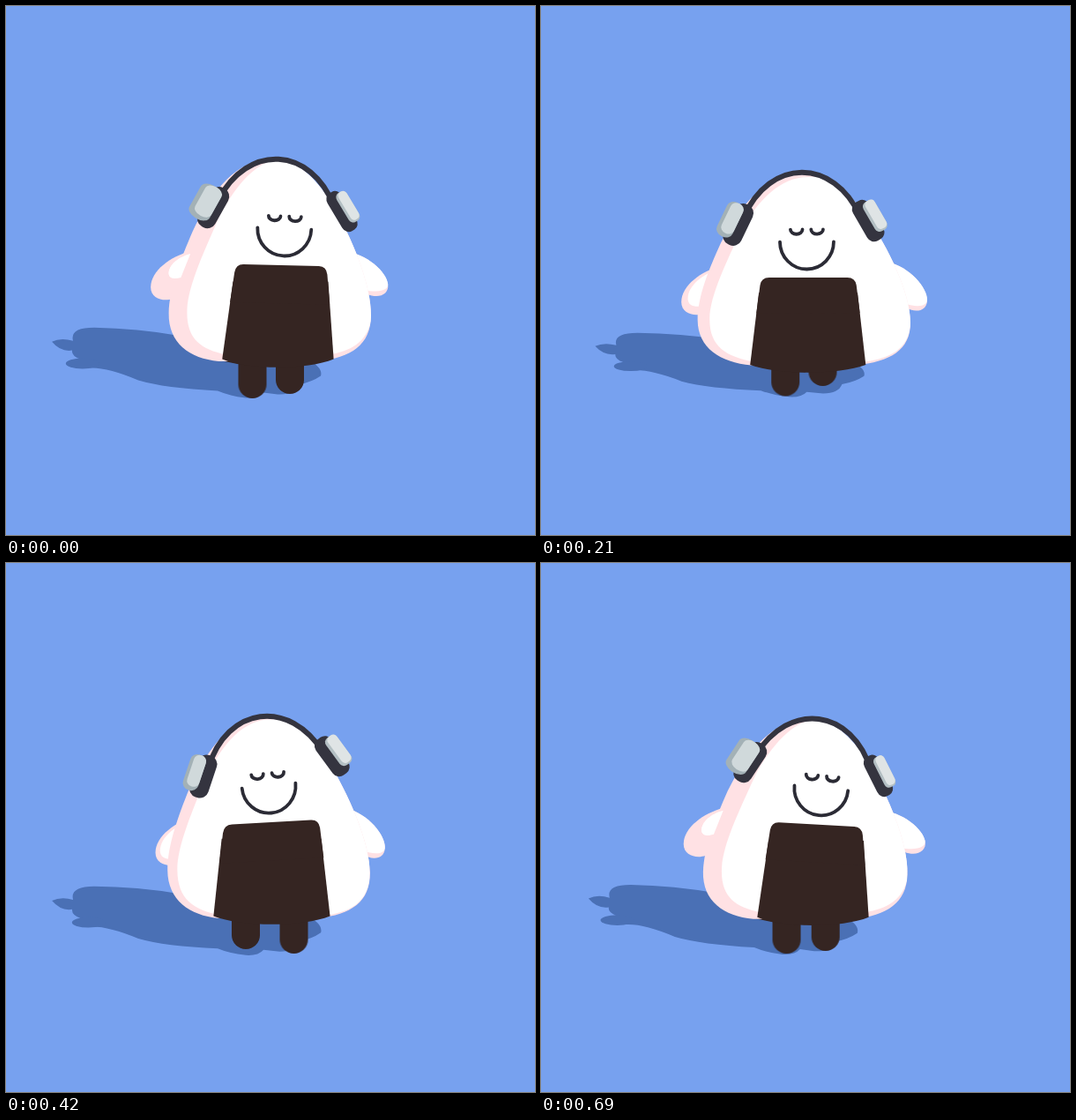
An HTML page without scripts for the animation above (720 ms loop, 600 by 600 pixels).

```html
<!DOCTYPE html>
<html lang="en">
<head>
<meta charset="utf-8">
<title>Dancing rice ball</title>
<style>
  /* bob: -1 stretched, 1 squashed. lean: -1 left, 1 right. yaw: 0 front, 1 turned. */
  @property --bob { syntax: "<number>"; inherits: true; initial-value: 0; }
  @property --lean { syntax: "<number>"; inherits: true; initial-value: 0; }
  @property --yaw { syntax: "<number>"; inherits: true; initial-value: 0; }

  @keyframes bob { from { --bob: -1; } to { --bob: 1; } }
  @keyframes lean { from { --lean: -1; } to { --lean: 1; } }
  @keyframes yaw { from { --yaw: 0; } to { --yaw: 1; } }

  html, body { margin: 0; width: 100%; height: 100%; overflow: hidden; background: #77a1ef; }

  svg {
    --sine: cubic-bezier(.364, 0, .636, 1);
    --tilt: calc(8 * var(--lean) + 2 * var(--bob) - 1);
    display: block;
    width: 100%;
    height: 100%;
    animation:
      bob 180ms var(--sine) -330ms infinite alternate,
      lean 180ms var(--sine) -230ms infinite alternate,
      yaw 360ms var(--sine) -380ms infinite alternate;
  }

  .pink { fill: #ffe1e4; }
  .white { fill: #fff; }
  .nori { fill: #352522; }
  .dark { fill: #34343f; }

  .shadow {
    fill: #4a70b5;
    transform:
      translate(calc(334.4px + 5px * var(--bob)), calc(376.5px + 2px * var(--bob)))
      skewY(calc(.5deg * (var(--lean) - .6)))
      scale(1, calc(.96 - .04 * var(--bob)))
      translate(-330px, -375px);
  }
  .shadow-hand { transform: translate(calc(-7px * (var(--lean) - .6)), 0); }

  .body {
    transform:
      translate(298px, calc(402.5px + 2.5px * var(--bob)))
      skewX(calc(-1.5deg * var(--lean)))
      scale(calc(1 + .027 * var(--bob)), calc(1 - .031 * var(--bob)))
      translate(-298px, -402.5px);
  }
  .front {
    transform:
      translate(416px, calc(402px - 4.5px * var(--yaw)))
      skewX(calc(-1.7deg * var(--yaw)))
      scale(calc(1 - .044 * var(--yaw)), 1)
      translate(-416px, -402px);
  }

  .underside { transform: translate(0, calc(3.5px * var(--bob))); }
  .wrap {
    transform:
      translate(calc(300.5px + 8px * var(--yaw)), calc(403.5px + 3.5px * var(--bob)))
      skewX(calc(-1.1deg * var(--lean) - 1.3deg * var(--yaw)))
      scale(calc(1 - .05 * var(--yaw)), calc(1 - .039 * var(--bob)));
  }
  .wrap-top { transform: translate(0, -103px) skewY(calc(.55deg * var(--tilt))); }

  .arm-left {
    --turn: min(1, var(--yaw) * (1.6 + var(--lean)) / 2);
    transform: translate(
      calc(180px - 5px * var(--bob) - 4px * var(--yaw) - 2px * var(--lean)),
      calc(330px + 5px * var(--bob) - 6px * var(--lean) - 4px * var(--yaw)));
  }
  .patch { transform: translate(30px, -37px) scale(calc(1 - .4 * var(--turn))) translate(-30px, 37px); }
  .near { opacity: clamp(0, 20 * (var(--yaw) - .5), 1); }
  .arm-right {
    transform:
      translate(
        calc(421.5px + 4px * var(--bob) + 3.5px * var(--lean)),
        calc(325.5px + 6.5px * var(--bob) - 5.5px * var(--lean)))
      rotate(calc(-9deg * var(--lean)));
  }

  .face {
    fill: none;
    stroke: #2b2b35;
    stroke-width: 3.8;
    stroke-linecap: round;
    transform:
      translate(
        calc(298.8px + 13px * var(--yaw) + 6.5px * var(--lean)),
        calc(259.5px + 8px * var(--bob)))
      rotate(calc(1deg * var(--tilt)));
  }

  .phones {
    transform:
      translate(
        calc(296.5px + 10.5px * var(--lean) + 4px * var(--yaw)),
        calc(219px + 8px * var(--bob)))
      rotate(calc(1.35deg * var(--tilt)));
  }
  .band { fill: none; stroke: #34343f; stroke-width: 6; }
  .cup-left { transform: translate(calc(-73px + 2px * var(--yaw)), 20.5px) rotate(26deg); }
  .cup-left .cap { transform: translate(-11px, -1px) scale(calc(1 + .55 * var(--yaw)), 1); }
  .cup-right {
    transform:
      translate(75px, 17px)
      rotate(calc(-28deg - 6deg * var(--yaw)))
      scale(calc(1 - .15 * var(--yaw)), 1);
  }
  .cup-right .cap { transform: translate(10px, -1px); }

  .foot-left { animation: step-left 720ms linear infinite; }
  .foot-right { animation: step-right 720ms linear infinite; }
  @keyframes step-left {
    0%, 100% { transform: translate(279.5px, 445px); }
    16.67% { transform: translate(278.5px, 444px); }
    41.67% { transform: translate(276px, 441px); }
    58.33% { transform: translate(272px, 438px); }
    66.67% { transform: translate(270.5px, 436px); }
    75% { transform: translate(270px, 431px); }
    83.33% { transform: translate(270.5px, 431px); }
    95.83% { transform: translate(278.5px, 443px); }
  }
  @keyframes step-right {
    0%, 100% { transform: translate(322px, 440px); }
    16.67% { transform: translate(318.5px, 435px); }
    25% { transform: translate(319px, 431px); }
    33.33% { transform: translate(320px, 431px); }
    41.67% { transform: translate(324px, 437px); }
    48% { transform: translate(326.5px, 443px); }
    66.67% { transform: translate(326.5px, 443px); }
    83.33% { transform: translate(325px, 440px); }
  }
</style>
</head>
<body>
<svg viewBox="0 0 600 600">
  <defs>
    <path id="shape" d="M299 182C327 182 347 201 368 230C392 268 416 320 416 355C416 387 394 401 355 405H240C206 402 181 385 181 352C181 325 194 292 207 262C230 215 257 182 299 182Z"/>
    <path id="leg" d="M-16-50V-16a16 16 0 0 0 32 0V-50Z"/>
    <clipPath id="outline"><use href="#shape"/></clipPath>
  </defs>

  <g class="shadow">
    <path d="M52 381Q62 376 76 380Q72 365 100 365Q150 366 195 374L340 400Q360 410 357 420Q347 427 332 430Q328 442 308 441L292 439Q286 446 272 445Q254 443 240 437Q180 434 150 425Q115 410 95 411L84 401Q74 397 75 391Q62 393 52 381Z"/>
    <ellipse class="shadow-hand" cx="87" cy="406" rx="19" ry="6"/>
  </g>

  <g class="nori">
    <use class="foot-left" href="#leg"/>
    <use class="foot-right" href="#leg"/>
    <path class="underside" d="M231 401Q262 412 300 412V395Z"/>
  </g>

  <g class="arm-left">
    <path class="pink" d="M30-40C8-34-15-18-15 1C-15 14 0 18 10 14L40 0Z"/>
    <path id="patch" class="white patch" d="M30-37C8-31-11-16-11 0C-11 10 0 12 12 8Z"/>
  </g>
  <g class="arm-right">
    <path class="pink" d="M-34-42C-7-37 13-13 13 1C13 13 0 16-12 9L-40-10Z"/>
    <path class="white" d="M-34-42C-7-37 13-13 13 0C13 7 4 10-16 4L-40-10Z"/>
  </g>

  <g class="body">
    <use class="pink" href="#shape"/>
    <g clip-path="url(#outline)">
      <path class="white front" d="M300 186C328 184 348 201 369 230C393 270 416 325 416 353C416 386 395 398 366 402H240C210 396 191 385 191 352C191 325 210 285 225 250C245 212 270 186 300 186Z"/>
    </g>
  </g>

  <g class="near"><g class="arm-left"><use href="#patch"/></g></g>

  <g class="nori wrap">
    <path d="M-56.8-85H56.8L66.5 0C35 12-35 12-66.5 0Z"/>
    <path class="wrap-top" d="M-59.5 42L-55.4 9Q-54 0-45 0H45Q54 0 55.4 9L59.5 42Z"/>
  </g>

  <g class="face">
    <path d="M-30.5 0A30.5 31 0 0 0 30.5 0"/>
    <path d="M-18.5-14a6.8 5.2 0 0 0 13.6 0M4.9-14a6.8 5.2 0 0 0 13.6 0"/>
  </g>

  <g class="phones">
    <path class="band" d="M-66 12C-36-55 36-55 66 12"/>
    <g class="cup-left">
      <rect class="dark" x="-11" y="-25" width="22" height="50" rx="10"/>
      <g class="cap">
        <rect x="-8.5" y="-21" width="17" height="42" rx="8" fill="#a3b1b6"/>
        <rect x="-5" y="-21" width="13.5" height="37" rx="6.5" fill="#d0d9db"/>
      </g>
    </g>
    <g class="cup-right">
      <rect class="dark" x="-11" y="-25" width="22" height="50" rx="9"/>
      <g class="cap">
        <rect x="-8" y="-19" width="16" height="38" rx="6" fill="#b3bfc3"/>
        <rect x="-4.5" y="-19" width="12.5" height="36" rx="5" fill="#dfe4e5"/>
      </g>
    </g>
  </g>
</svg>
</body>
</html>
```
